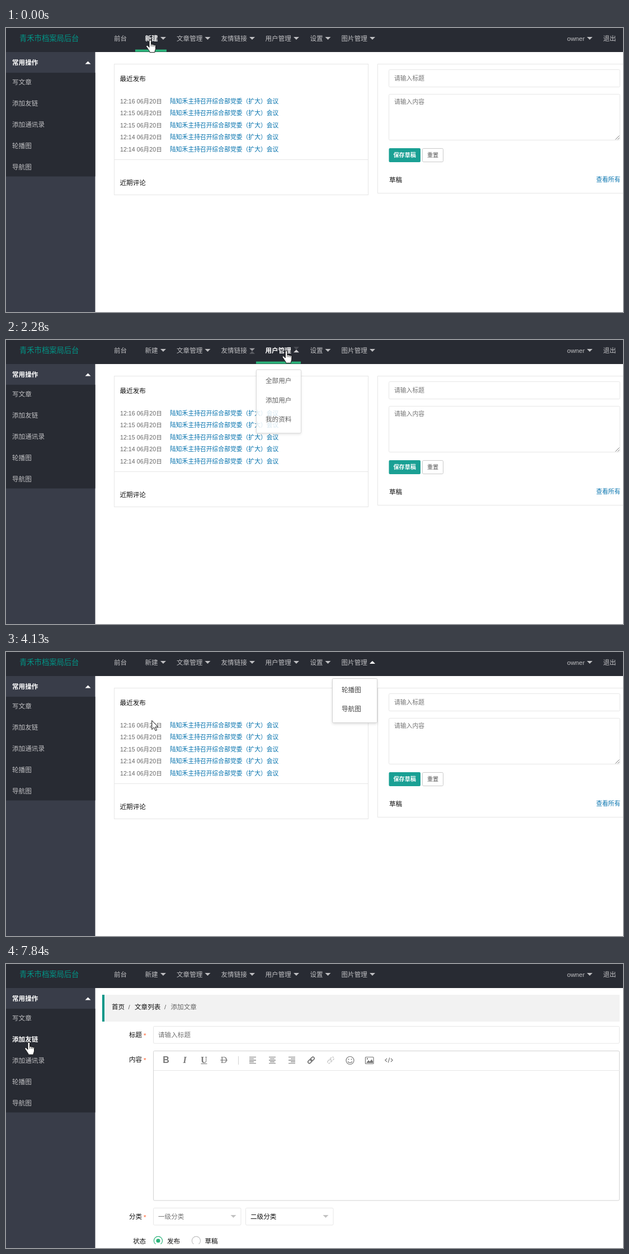
Write an HTML page that moves like this. It is 1103 px wide and 508 px high and loops after 8 s.

```html
<!DOCTYPE html>
<html lang="zh">
<head>
<meta charset="utf-8">
<style>
  html, body { margin: 0; width: 100%; height: 100%; overflow: hidden; background: #fff; }
  svg { display: block; width: 1103px; height: 508px; }
  text { font-family: "Liberation Sans", "Noto Sans CJK SC", "Noto Sans CJK", sans-serif; white-space: pre; }
  .menu { filter: drop-shadow(0 2px 2px rgba(0, 0, 0, .12)); }
</style>
</head>
<body>
<svg id="stage" viewBox="0 0 1103 508">
  <clipPath id="view"><rect width="1103" height="501"/></clipPath>
  <g id="frame"></g>
  <g id="dashboard"></g>
  <g id="loading"></g>
  <g id="editor" clip-path="url(#view)"></g>
  <g id="live"></g>
</svg>
<script>
const LOOP = 8000, TEAL = '#009688', GREEN = '#2bb37a', DARK = '#282b33';
const LINK = '#0673ae', INK = '#111', HINT = '#757575', LINE = '#e6e6e6', DIM = '#bfbfc2', ICON = '#777';
const LOAD = 6180, READY = 6590, SIDE_WIDTH = 159.5, BOLD = 'font-weight="700"';

const $ = id => document.getElementById(id);

// Text is placed by its left edge and vertical centre.
const text = (x, cy, s, size = 11.6, fill = INK, more = '') =>
  `<text x="${x}" y="${cy + size * .37}" font-size="${size}" fill="${fill}" ${more}>${s}</text>`;
const rect = (x, y, w, h, fill, more = '') =>
  `<rect x="${x}" y="${y}" width="${w}" height="${h}" fill="${fill}" ${more}/>`;
const box = (x, y, w, h, stroke = LINE, r = 2) => rect(x, y, w, h, '#fff', `stroke="${stroke}" rx="${r}"`);
const path = (d, stroke, width = 1, fill = 'none', more = '') =>
  `<path d="${d}" stroke="${stroke}" stroke-width="${width}" fill="${fill}" ${more}/>`;
const circle = (x, y, r, stroke, fill = 'none', width = 1.2) =>
  `<circle cx="${x}" cy="${y}" r="${r}" stroke="${stroke}" fill="${fill}" stroke-width="${width}"/>`;
const down = (x, y, fill, opacity = 1) => path(`M${x} ${y}h10l-5 5z`, 'none', 0, fill, `opacity="${opacity}"`);
const up = (x, y, fill, opacity = 1) => path(`M${x} ${y}h10l-5-5z`, 'none', 0, fill, `opacity="${opacity}"`);

// Top navigation: label, text x, bar left and width, caret x, pointer entry time, menu opening time, entries
const nav = [
  ['新建', 248.5, 231, 56, 276, -300, 40, ['写文章', '添加友链']],
  ['文章管理', 305, 288, 80, 355.5, 470, 770, ['全部文章', '写文章']],
  ['友情链接', 384.5, 368, 79, 435, 1150, 1450, ['全部友链', '添加友链']],
  ['用户管理', 463.5, 447, 80, 514, 1840, 2140, ['全部用户', '添加用户', '我的资料']],
  ['设置', 543.5, 527, 58, 570.5, 2520, 2820, ['网站设置']],
  ['图片管理', 599.5, 583, 79, 650, 2950, 3250, ['轮播图', '导航图']]
].map(([label, x, left, width, caret, enter, open, items]) =>
  ({ label, x, left, width, caret, enter, open, items }));
const LEAVE = 3830, CLOSE = 4140;
const side = ['写文章', '添加友链', '添加通讯录', '轮播图', '导航图'];

// Pointer: time, left, top
const pointer = [
  [0, 250, 20.5], [330, 250, 20.5], [470, 280, 21], [700, 318, 21], [860, 321, 21], [1150, 360, 20],
  [1500, 420, 18], [1700, 420.5, 18], [1840, 440, 18], [2250, 490, 18], [2520, 519, 18],
  [2820, 557, 17], [2950, 575, 17], [3350, 621, 17], [3650, 621, 17], [3830, 596, 38],
  [4100, 274, 120], [4300, 150, 130], [4650, 42, 99], [6750, 42, 99], [7250, 33, 140],
  [7550, 33, 140], [7610, 33, 139], [LOOP, 33, 139]
];

const clamp = p => Math.min(1, Math.max(0, p));

// The CSS "ease" curve
function ease(p) {
  if (p <= 0 || p >= 1) return clamp(p);
  let lo = 0, hi = 1;
  const curve = (s, a, b) => 3 * (1 - s) ** 2 * s * a + 3 * (1 - s) * s * s * b + s ** 3;
  for (let i = 0; i < 20; i++) {
    const mid = (lo + hi) / 2;
    if (curve(mid, .25, .25) < p) lo = mid; else hi = mid;
  }
  return curve(lo, .1, 1);
}

function pointerAt(t) {
  const i = Math.max(1, pointer.findIndex(k => k[0] > t));
  const [t0, x0, y0] = pointer[i - 1], [t1, x1, y1] = pointer[i];
  const p = clamp((t - t0) / (t1 - t0));
  return [x0 + (x1 - x0) * p, y0 + (y1 - y0) * p];
}

function drawFrame() {
  return rect(0, 0, 1103, 43, DARK) + rect(0, 43, SIDE_WIDTH, 465, '#393d49') + rect(0, 80, SIDE_WIDTH, 185.5, DARK) +
    text(24, 18, '青禾市档案局后台', 13.3, TEAL) + text(193, 18.5, '前台', 11.6, DIM) +
    text(1003, 18.5, 'owner', 11.6, DIM) + text(1067.5, 18.5, '退出', 11.6, DIM) +
    text(11, 61.5, '常用操作', 11.6, '#fff', BOLD);
}

function drawDashboard() {
  const times = ['12:16', '12:15', '12:15', '12:14', '12:14'];
  return box(193.5, 64.5, 454, 234, LINE, 0) + path('M193 235.5h454', LINE) +
    text(203.5, 90.5, '最近发布') + text(203.5, 276.5, '近期评论') +
    times.map((time, i) => text(204, 131 + i * 21.5, time + ' 06月20日', 10.7, '#666') +
      text(293, 131 + i * 21.5, '陆知禾主持召开综合部党委（扩大）会议', 10.8, LINK)).join('') +
    box(664.5, 64.5, 450, 231, LINE, 0) +
    box(684.5, 74.5, 413, 31) + text(694, 90.5, '请输入标题', 10.8, HINT) +
    box(684.5, 118.5, 413, 82) + text(694, 132, '请输入内容', 10.8, HINT) +
    path('M1089.5 199.5l7-7M1093.5 199.5l3-3', '#777') +
    rect(684.5, 215, 56.5, 25, '#1aa094', 'rx="2"') + text(692.5, 227.5, '保存草稿', 10.1, '#fff', BOLD) +
    box(744.5, 215.5, 37, 24, '#c9c9c9') + text(753, 227.5, '重置', 10.1, '#555') +
    text(685, 271.5, '草稿') + text(1055, 271.5, '查看所有', 10.8, LINK);
}

const required = (cy, label) => text(220, cy, label) + text(246, cy + 1, '*', 11.6, '#ff5722');
const formTop = () => rect(172, 55, 925, 48, '#f2f2f2') + rect(172, 55, 4, 48, TEAL) +
  required(127, '标题') + box(263.5, 111.5, 833, 30.5) + text(272, 127, '请输入标题', 11.6, HINT) +
  required(171, '内容');

function drawLoading() {
  return formTop() + box(263.5, 155.5, 833, 82) + required(267, '分类') + text(227, 311, '状态');
}

function drawToolbar() {
  const glyph = (x, s, more) => text(x, 171.5, s, 16, ICON, `text-anchor="middle" ${more}`);
  const serif = `style="font-family:'Liberation Serif',serif"`;
  const align = (x, shift) => path([0, 1, 2, 3, 4].map(i => {
    const w = i % 2 ? 8 : 12;
    return `M${x - 6 + (12 - w) * shift} ${166.5 + i * 2.8}h${w}`;
  }).join(''), ICON, 1.1);
  const chain = (x, color, more = '') =>
    `<g transform="rotate(-45 ${x} 172)" fill="none" stroke="${color}" stroke-width="1.7" ${more}>` +
    `<rect x="${x - 7}" y="169.5" width="8" height="5" rx="2.5"/><rect x="${x - 1}" y="169.5" width="8" height="5" rx="2.5"/></g>`;
  return glyph(286, 'B', BOLD) + glyph(319.5, 'I', `${serif} font-style="italic" ${BOLD}`) +
    glyph(354, 'U', `${serif} ${BOLD}`) + path('M348.5 178.5h11', ICON) +
    glyph(389.5, 'D', serif) + path('M383 172h13', ICON) +
    path('M415.5 165v15', '#d2d2d2') +
    align(441, 0) + align(476, .5) + align(511, 1) +
    chain(545.5, ICON) + chain(580.5, '#ccc', 'stroke-dasharray="3 1.5"') +
    circle(615, 172.5, 7, ICON) + circle(612.5, 170.5, .9, 'none', ICON) + circle(617.5, 170.5, .9, 'none', ICON) +
    path('M611 174.5q4 4.5 8 0', ICON, 1.2) +
    rect(642.5, 166.5, 14.5, 12, 'none', `stroke="${ICON}" stroke-width="1.2" rx="1"`) +
    path('M644 177l4-5 2.5 2.5 3-4 2.5 4v2.5z', 'none', 0, ICON) + circle(646, 169.5, 1.2, 'none', ICON) +
    path('M681 169l-3.2 3 3.2 3M688 169l3.2 3-3.2 3M685.8 167.5l-2.6 9', ICON, 1.1);
}

function drawEditor() {
  const select = (x, label, color) => box(x, 436.5, 156.5, 30.5) + text(x + 8.5, 452, label, 11.6, color) +
    down(x + 138, 449, '#c2c2c2');
  return formTop() + text(189, 77, '首页') + text(218.5, 77, '/', 11.6, '#666') + text(230, 77, '文章列表') +
    text(283, 77, '/', 11.6, '#666') + text(294.5, 77, '添加文章', 11.6, '#666') +
    box(263.5, 155.5, 833, 267.5, '#d2d2d2') + path('M264 190.5h833', LINE) + drawToolbar() +
    required(452, '分类') + select(263.5, '一级分类', HINT) + select(428.5, '二级分类', INK) +
    text(227, 496, '状态') + circle(272, 495, 7.6, GREEN, '#fff') + circle(272, 495, 3.6, 'none', GREEN) +
    text(288, 496, '发布') + circle(340, 495, 7.6, '#c2c2c2', '#fff') + text(355.5, 496, '草稿');
}

function drawMenu(item, age) {
  const p = ease(age / 300), height = 10 + 34.5 * item.items.length;
  return `<g class="menu" opacity="${.3 + .7 * p}" transform="translate(${item.left + .5} ${47.5 + 24.5 * (1 - p)})">` +
    box(0, 0, 80, height, '#d2d2d2') +
    item.items.map((s, i) => text(16.5, 20 + i * 34.5, s, 11.6, '#444')).join('') + '</g>';
}

function drawBar(t) {
  const i = nav.findLastIndex(n => t >= n.enter);
  const to = nav[i], from = nav[Math.max(0, i - 1)], p = ease((t - to.enter) / 200);
  const mix = key => from[key] + (to[key] - from[key]) * p;
  return rect(mix('left'), 38.5, mix('width'), 4, GREEN, `opacity="${1 - ease((t - LEAVE) / 200)}"`);
}

function drawPointer(t) {
  const [x, y] = pointerAt(t);
  const arrow = 'M6 1v16l3.8-3.6 2.6 5.8 2.4-1-2.6-5.7h5z';
  const hand = 'M6 14V2.8a1.8 1.8 0 0 1 3.6 0V9a1.6 1.6 0 0 1 2.8.6 1.6 1.6 0 0 1 2.6.7 1.5 1.5 0 0 1 2.5 1.3V16' +
    'c0 3-1.5 4-1.7 7.2H7.2c-.4-3-2.8-4.6-4-7.2L.9 13c-.8-1.7 1.2-2.9 2.6-1.7z';
  const overPage = t > 3850 && t < 4400;
  return `<g transform="translate(${x} ${y})">` + path(overPage ? arrow : hand, '#111', 1, '#fff', 'stroke-linejoin="round"') +
    (overPage ? '' : path('M9.6 9v3.5M12.4 9.8v3M15 10.6v2.5', '#111', .8)) + '</g>';
}

function drawLive(t) {
  const hasCarets = t < LOAD || t >= READY;
  const hovered = t < LEAVE ? nav.findLastIndex(n => t >= n.enter) : -1;
  const sideHover = t < 4540 ? -1 : t < 7020 ? 0 : 1;
  const item = (x, cy, label, lit) => text(x, cy, label, 11.6, lit ? '#fff' : DIM, lit ? BOLD : '');
  let out = '';
  nav.forEach((entry, i) => {
    const close = i < nav.length - 1 ? nav[i + 1].open : CLOSE;
    out += item(entry.x, 18.5, entry.label, i === hovered);
    if (hasCarets) {
      const k = ease((t - entry.open) / 300) - ease((t - close) / 300), top = 16 - 5 * k;
      out += down(entry.caret, top, '#fff', .7 * (1 - k)) + up(entry.caret, top + 10, '#fff', k);
    }
    if (t >= entry.open && t < close) out += drawMenu(entry, t - entry.open);
  });
  if (hasCarets) out += down(1038.5, 16, '#fff', .7) + up(141.5, 64.5, '#fff');
  if (t >= 4790 && t < LOAD) out += rect(0, 80, SIDE_WIDTH, 33, TEAL);
  side.forEach((label, i) => out += item(11, 97 + 38 * i, label, i === sideHover));
  return out + drawBar(t) + drawPointer(t);
}

$('frame').innerHTML = drawFrame();
$('dashboard').innerHTML = drawDashboard();
$('loading').innerHTML = drawLoading();
$('editor').innerHTML = drawEditor();

const show = (id, on) => $(id).setAttribute('visibility', on ? 'visible' : 'hidden');
function tick() {
  const t = performance.now() % LOOP;
  show('dashboard', t < LOAD);
  show('loading', t >= LOAD && t < READY);
  show('editor', t >= READY);
  $('live').innerHTML = drawLive(t);
  requestAnimationFrame(tick);
}
tick();
</script>
</body>
</html>
```
